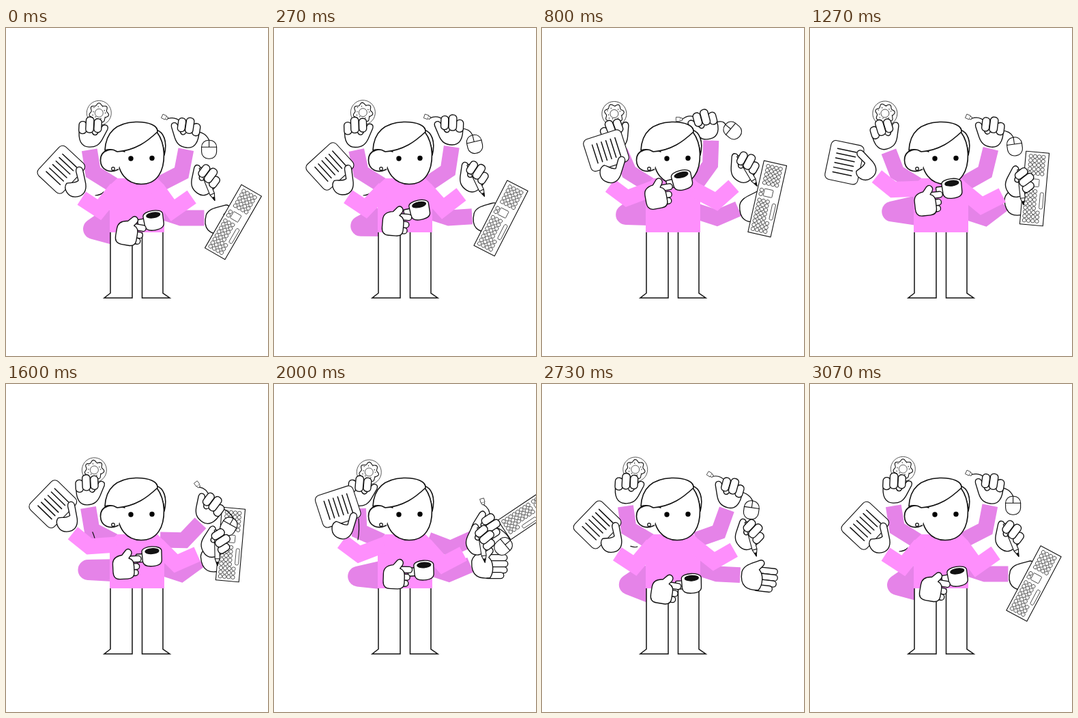
Write an HTML page that moves like this. It is 384 by 480 pixels and loops after 3140 ms.

```html
<!DOCTYPE html>
<html lang="en">
<head>
<meta charset="utf-8">
<title>Many hands</title>
<style>
  html, body { margin: 0; width: 100%; height: 100%; overflow: hidden; background: #fff; }
  svg { display: block; width: 100vw; height: 100vh; }
  .ink { fill: #fff; stroke: #111; stroke-width: 1.35; stroke-linejoin: round; stroke-linecap: round; }
  .prop { fill: #fff; stroke: #111; stroke-width: 1.1; stroke-linejoin: round; stroke-linecap: round; }
  .thin { fill: #fff; stroke: #333; stroke-width: .8; stroke-linejoin: round; }
  .line { fill: none; stroke: #111; stroke-width: 1.2; stroke-linecap: round; }
  .sleeve { fill: none; stroke-width: 23; stroke-linejoin: miter; }
  .back { stroke: #e583e8; }
  .front { stroke: #fe8ffc; }
  .shirt { fill: #fe8ffc; }
</style>
</head>
<body>
<svg viewBox="0 0 384 480" xmlns="http://www.w3.org/2000/svg">
  <defs>
    <path id="palm" d="M-18-10C-20 8-14 17-3 17C7 17 12 13 16 5L23-10C25-17 17-19 14-13L9-4C7 0 3 0 1-4"/>
    <g id="fingers">
      <rect x="-19" y="-20" width="11" height="18" rx="5"/>
      <rect x="3" y="-25" width="11" height="20" rx="5"/>
      <rect x="-9" y="-27" width="11.500" height="23" rx="5"/>
    </g>
  </defs>

  <path id="mugArm" class="sleeve back" style="stroke-width:30;stroke-linejoin:round"/>
  <path id="donutArm" class="sleeve back"/>
  <path id="mouseArm" class="sleeve back"/>
  <path id="boardArm" class="sleeve back"/>
  <path id="strand" class="line"/>

  <g id="donutGrip">
    <g class="thin" transform="translate(14 -54)">
      <circle r="18"/>
      <path id="icing" stroke="#111" stroke-width="1.100"/>
      <circle r="6"/>
      <path id="sprinkles" stroke-width="1.100"/>
    </g>
    <g class="ink" transform="translate(3 -21) rotate(3)"><use href="#palm"/><use href="#fingers"/></g>
  </g>

  <g id="boardGrip" class="ink">
    <g transform="translate(21 -2)">
      <rect x="2" y="-13" width="31" height="9" rx="4.500"/>
      <rect x="2" y="-4" width="32" height="9" rx="4.500"/>
      <rect x="2" y="5" width="31" height="9" rx="4.500"/>
      <rect x="0" y="13" width="28" height="9" rx="4.500"/>
      <path d="M-19-3C-17-14-5-17 4-22C11-26 15-19 10-14L6-9C13-3 14 12 8 21C-8 23-20 19-19-3Z"/>
    </g>
  </g>
  <g id="board" class="thin">
    <rect class="prop" x="-17" y="-53.500" width="34" height="107"/>
    <g id="keys"></g>
    <rect x="-7" y="-14" width="13" height="11" rx="1"/>
    <rect x="9" y="5" width="5" height="24" rx="2"/>
  </g>

  <path id="cord" class="line"/>
  <g id="mouse" class="prop">
    <rect x="-11" y="-13" width="22" height="27" rx="10"/>
    <path d="M-11-3H11M0-13V-3"/>
  </g>
  <g id="mouseGrip">
    <path class="line" d="M-27-45Q-16-49-7-40"/>
    <g class="thin" transform="translate(-31 -47) rotate(25)"><rect x="-4.500" y="-3" width="6" height="6"/><path d="M1.500-2h3v4h-3"/></g>
    <g class="ink" transform="translate(0 -20) rotate(8) scale(-1 1)"><use href="#palm"/><use href="#fingers"/></g>
  </g>

  <g class="ink" style="stroke-width:1.5;stroke-linejoin:miter">
    <path d="M153 292V388L144 395H185V292Z"/>
    <path d="M199.500 292V395H240L230 388V292Z"/>
  </g>
  <path class="shirt" d="M152 299V230L163 220H222L232 230V299Z"/>
  <path id="paperArm" class="sleeve front"/>
  <path id="penArm" class="sleeve front"/>

  <g id="paperGrip">
    <g class="prop" transform="translate(-30 -42) rotate(43)">
      <rect x="-24.500" y="-29" width="49" height="58" rx="7"/>
      <path stroke-width="1.500" d="M-14-18H14M-14-11H14M-14-4H14M-14 3H14M-14 10H14M-14 17H14"/>
    </g>
    <path class="ink" transform="translate(-8 -22) rotate(3)" d="M-14 1C-19 9-11 21 0 20C12 19 16 10 14 0L9-19C7-27-3-25-1-17L3-4C-2 1-10-1-14 1Z"/>
  </g>

  <g id="penGrip">
    <g class="ink" transform="translate(16 -21) rotate(37) scale(-1 1)"><use href="#palm"/></g>
    <g class="prop" transform="translate(24 -19) rotate(-22)">
      <path d="M-3.500-26H3.500V16L0 26L-3.500 16ZM-3.500-20H3.500M-3.500 16H3.500"/>
      <path fill="#111" d="M-1.500 21H1.500L0 26Z"/>
    </g>
    <g class="ink" transform="translate(16 -21) rotate(37) scale(-1 1)"><use href="#fingers"/></g>
  </g>

  <g class="ink" style="stroke-width:1.6">
    <path d="M220 149C231 152 237 166 232 186C231 172 228 162 219 156Z"/>
    <path d="M163 181C162 213 178 228.500 198 228.500C222 228.500 232 209 231.500 184C231 170 227 160 221 152L190 150Z"/>
    <path d="M174 181C155 174 138 178 138.500 194C139 208 152 213 164.500 207"/>
    <path d="M145 179C146 158 156 139 190 137.500C210 137 223 143 222 152C207 166 190 179 163 181C157 177 151 177 145 179Z"/>
    <circle cx="157" cy="206" r="2.300" stroke-width="1.200"/>
  </g>
  <circle cx="183" cy="191" r="3.700"/>
  <circle cx="214" cy="190.500" r="3.700"/>

  <g id="mug" class="ink">
    <rect x="-23" y="-5" width="13" height="12" rx="2"/>
    <path d="M-14-8C-14-17 15-17 15-8L14.500 6C14 12 8 14 0 14C-8 14-13 12-13.500 6Z"/>
    <ellipse cx="1" cy="-8" rx="10" ry="3.800" fill="#111"/>
  </g>
  <g id="mugHand" class="ink">
    <rect x="2" y="7" width="17" height="9" rx="4.500"/>
    <rect x="2" y="-2" width="19" height="9" rx="4.500"/>
    <rect x="2" y="-13" width="22" height="9" rx="4.500"/>
    <path d="M-18-2C-18-11-12-14-4-15L2-22C7-26 13-20 9-14L6-10C12-8 13-4 13 2V11C13 17 9 20 3 20H-8C-15 20-18 16-18 9Z"/>
  </g>
</svg>

<script>
const LOOP = 3140, STEP = LOOP / 47;
const $ = id => document.getElementById(id);
const put = (id, x, y, deg) => $(id).setAttribute('transform', `translate(${x} ${y}) rotate(${deg})`);
const trace = (id, d) => $(id).setAttribute('d', d);
const clamp = u => Math.min(1, Math.max(0, u));
const smooth = u => (u = clamp(u), u * u * (3 - 2 * u));

// Rises from 0 to 1 at the top time, then falls back
const bump = (t, from, top, to) => smooth(t < top ? (t - from) / (top - from) : (to - t) / (to - top));

// A step of the given length towards an angle, y pointing down
function polar([x, y], length, deg) {
  const a = deg * Math.PI / 180;
  return [x + length * Math.cos(a), y + length * Math.sin(a)];
}

// The few gestures that drive all limbs
const gestures = t => ({
  sweep: bump(t, 0, 1400, 2800),
  lift: bump(t, 0, 800, 1500),
  lean: bump(t, 0, 1000, 1900),
  flick: bump(t, 800, 1270, 2000),
  drop: bump(t, 1100, 2000, 2900),
  late: bump(t, 2000, 2400, 3070),
  sip: bump(t, 0, 800, 2400)
});

// Resting values plus what each gesture adds to them
const blend = (rest, moves, g) => rest.map((v, i) =>
  Object.keys(moves).reduce((sum, name) => sum + g[name] * moves[name][i], v));

// Angles of upper arm, forearm and wrist
const arms = {
  donut: { from: [158, 230], upper: 36, fore: 33, rest: [212, 261, 0],
    moves: { lean: [0, -16, -26], drop: [-8, 6, 2] } },
  mouse: { from: [226, 228], upper: 35, fore: 35, rest: [-27, -79, 0],
    moves: { lift: [-27, -9, -23], drop: [48, 55, 49] } },
  board: { from: [226, 268], upper: 32, fore: 34, rest: [18, 0, 12],
    moves: { sweep: [0, -38, -20], late: [0, 6, -8] } },
  paper: { from: [162, 235], upper: 40, fore: 31, rest: [129, 213, 0],
    moves: { sweep: [50, 6, 48], flick: [0, 0, -78] } },
  pen: { from: [222, 236], upper: 38, fore: 34, rest: [54, -35, 0],
    moves: { sweep: [-10, 12, 22], lift: [-20, -14, -22], late: [-24, 8, 10] } }
};

function drawArm(name, g) {
  const { from, upper, fore, rest, moves } = arms[name];
  const [a, b, wrist] = blend(rest, moves, g);
  const elbow = polar(from, upper, a), cuff = polar(elbow, fore, b);
  trace(name + 'Arm', `M${from}L${elbow}L${cuff}`);
  put(name + 'Grip', ...cuff, wrist);
  return { cuff, wrist };
}

function drawMouse({ cuff, wrist }, g) {
  const [hx, hy] = polar(cuff, 20, wrist - 90);
  const [mx, my] = polar([hx, hy], 39, 30 - 25 * g.lift + 8 * g.drop);
  const tilt = 50 * (g.drop - g.lift);
  const [tx, ty] = polar([mx, my], 13, tilt - 90);
  put('mouse', mx, my, tilt);
  trace('cord', `M${hx + 8} ${hy - 6}Q${(hx + tx) / 2 + 11} ${(hy + ty) / 2 - 11} ${tx} ${ty}`);
}

function drawMug(g) {
  const [hx, hy, turn] = blend([180, 298, 10], { sip: [-11, -54, -20], drop: [0, -10, -5], late: [-2, 8, 0] }, g);
  const mug = blend([216, 282, -9], { sip: [-11, -59, -12], sweep: [0, 0, 12], drop: [5, 0, 0], late: [3, 16, 9] }, g);
  const elbow = blend([128, 294], { sip: [0, -10], sweep: [-8, -18] }, g);
  put('mugHand', hx, hy, turn);
  put('mug', ...mug);
  trace('mugArm', `M157 274L${elbow}L${hx - 15} ${hy + 6}`);
}

// Raised slowly, flung off to the right, then snapped back into the hand
function drawBoard(t) {
  const rise = smooth(t / 1270), fling = clamp((t - 1600) / 530) ** 2;
  const back = t > 3050;
  const settle = back ? (LOOP - t) / STEP : 0;
  const pose = back ? [333 - 5 * settle, 284 + 8 * settle, 30 - 2 * settle]
    : [333 - 4 * rise + 91 * fling, 284 - 49 * rise - 88 * fling, 30 - 25 * rise + 88 * fling];
  put('board', ...pose);
  $('board').style.display = back || t < 2120 ? '' : 'none';
}

function dressProps() {
  let keys = '';
  const key = (x, y) => keys += `<circle cx="${x}" cy="${y}" r="2.700"/>`;
  for (let r = 0; r < 5; r++) for (let c = 0; c < 4; c++) key(c * 6.2 - 9.3, r * 6.2 - 47);
  for (let r = 0; r < 8; r++) for (let c = 0; c < 4; c++) {
    if (c < 3 || r > 4) key(c * 6.2 - 11, r * 6.2 + 4);
  }
  for (let r = 0; r < 2; r++) key(-11, r * 6 - 11);
  $('keys').innerHTML = keys;

  const icing = [];
  for (let a = 0; a < 360; a += 6) icing.push(polar([0, 0], 13 + 1.6 * Math.sin(a * Math.PI / 180 * 7), a));
  trace('icing', `M${icing.join('L')}Z`);

  let bits = '';
  for (let i = 0; i < 11; i++) {
    const p = polar([0, 0], 8.5 + i % 2 * 1.8, i * 33);
    bits += `M${p}L${polar(p, 1.6, i * 77)}`;
  }
  trace('sprinkles', bits);
}

function draw(t) {
  const g = gestures(t);
  for (const name of ['donut', 'board', 'paper', 'pen']) drawArm(name, g);
  drawMouse(drawArm('mouse', g), g);
  drawMug(g);
  drawBoard(t);
  const [x1, y1, x2, y2] = blend([131, 245, 143, 240], { drop: [-7, -48, -20, -12] }, g);
  trace('strand', `M${x1} ${y1}Q${(x1 + x2) / 2 + 2} ${(y1 + y2) / 2 + 2} ${x2} ${y2}`);
}

function tick() {
  const t = (performance.now() + 5) % LOOP;
  draw(Math.floor(t / STEP) * STEP);
  requestAnimationFrame(tick);
}

dressProps();
tick();
</script>
</body>
</html>
```
